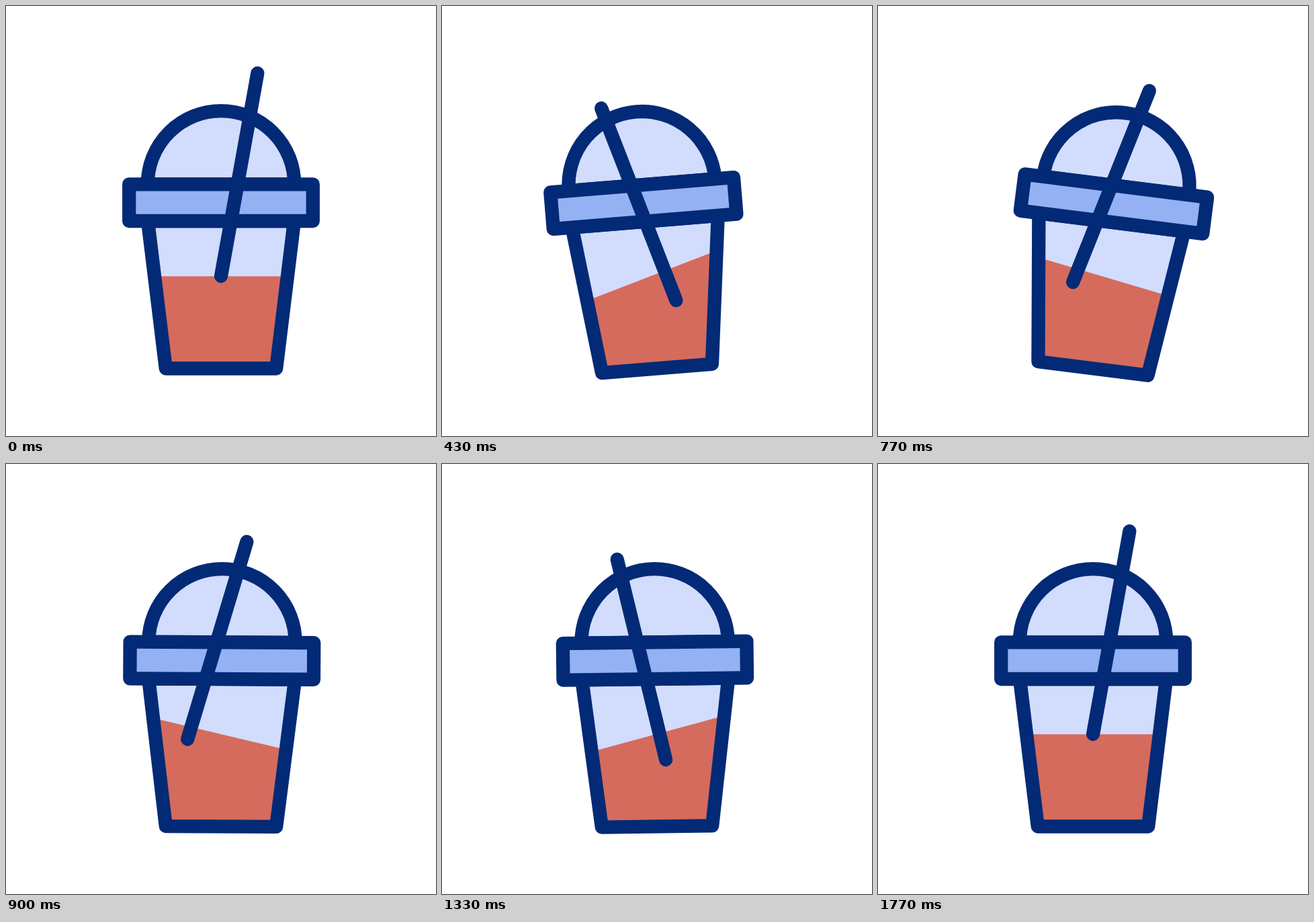
An HTML page with a canvas for the animation above (2000 ms loop, 640 px wide and 640 px high).

```html
<!DOCTYPE html>
<html lang="en">
<head>
<meta charset="utf-8">
<title>Shaking cup</title>
<style>
html, body { margin: 0; width: 100%; height: 100%; overflow: hidden; background: #fff; }
canvas { display: block; width: 640px; height: 640px; }
</style>
</head>
<body>
<canvas id="stage"></canvas>
<script>
const LOOP = 2000;
const NAVY = '#032a76', GLASS = '#d2dcfd', BAND = '#94b1f3', DRINK = '#d56b5d';
const PIVOT = { x: 320, y: 539.5 };
const LEVEL = 402.3;
const STRAW_HALF = 153.4;

const canvas = document.getElementById('stage');
const ctx = canvas.getContext('2d');
const dpr = window.devicePixelRatio || 1;
canvas.width = canvas.height = 640 * dpr;

const smooth = s => s * s * (3 - 2 * s);
const brisk = s => 0.8 * smooth(s) + 0.2 * s;

// Eases from one [step, value] turning point to the next
function swing(ease, ...turns) {
  return t => {
    const i = turns.findIndex(([at]) => at > t);
    if (i < 0) return turns[turns.length - 1][1];
    const [t0, v0] = turns[i - 1], [t1, v1] = turns[i];
    return v0 + (v1 - v0) * ease((t - t0) / (t1 - t0));
  };
}

// Angles in degrees on the stage, straw centre relative to the upright cup
const cupTilt = swing(brisk, [0, 0], [8, -13.3], [20.2, 9.7], [32, -5.8], [42, 0]);
const drinkTilt = swing(smooth, [0, 0], [10.3, -25.6], [23.7, 16.8], [40, -15.2], [53, 0]);
const strawTilt = swing(smooth, [0, 10.2], [10, -27.8], [23.2, 21.8], [39.2, -13.9], [53, 10.2]);
const strawX = swing(smooth, [0, 347.2], [11.6, 312.8], [30, 312.8], [40, 300], [53, 347.2]);
const strawY = swing(smooth, [0, 251], [15, 296], [25.7, 262], [40, 290.7], [53, 251]);

const cup = new Path2D('M211 320 L237.8 539.5 H402.2 L429 320 Z');
const dome = new Path2D('M210.8 265.3 A109.2 109.2 0 0 1 429.2 265.3 Z');
const lid = new Path2D('M183.2 265.3 H456.8 V320 H183.2 Z');

function turned(x, y, deg, draw) {
  ctx.save();
  ctx.translate(x, y);
  ctx.rotate(deg * Math.PI / 180);
  draw();
  ctx.restore();
}

function shape(path, fill) {
  ctx.fillStyle = fill;
  ctx.fill(path);
  ctx.stroke(path);
}

function drawCup(t, tilt) {
  ctx.fillStyle = GLASS;
  ctx.fill(cup);

  ctx.save();
  ctx.clip(cup);
  turned(320, LEVEL, drinkTilt(t) - tilt, () => {
    ctx.fillStyle = DRINK;
    ctx.fillRect(-250, 0, 500, 300);
  });
  ctx.restore();

  ctx.stroke(cup);
  shape(dome, GLASS);
  shape(lid, BAND);

  turned(strawX(t), strawY(t), strawTilt(t) - tilt, () => {
    ctx.beginPath();
    ctx.moveTo(0, -STRAW_HALF);
    ctx.lineTo(0, STRAW_HALF);
    ctx.stroke();
  });
}

function render(t) {
  const tilt = cupTilt(t);
  ctx.setTransform(dpr, 0, 0, dpr, 0, 0);
  ctx.fillStyle = '#fff';
  ctx.fillRect(0, 0, 640, 640);
  ctx.strokeStyle = NAVY;
  ctx.lineWidth = 20.3;
  ctx.lineCap = ctx.lineJoin = 'round';
  turned(PIVOT.x, PIVOT.y, tilt, () => {
    ctx.translate(-PIVOT.x, -PIVOT.y);
    drawCup(t, tilt);
  });
}

const start = performance.now();

function tick() {
  const ms = Math.max(0, performance.now() - start) % LOOP;
  render(Math.floor(ms * 0.03 + 0.15)); // 30 steps per second
  requestAnimationFrame(tick);
}
tick();
</script>
</body>
</html>
```
